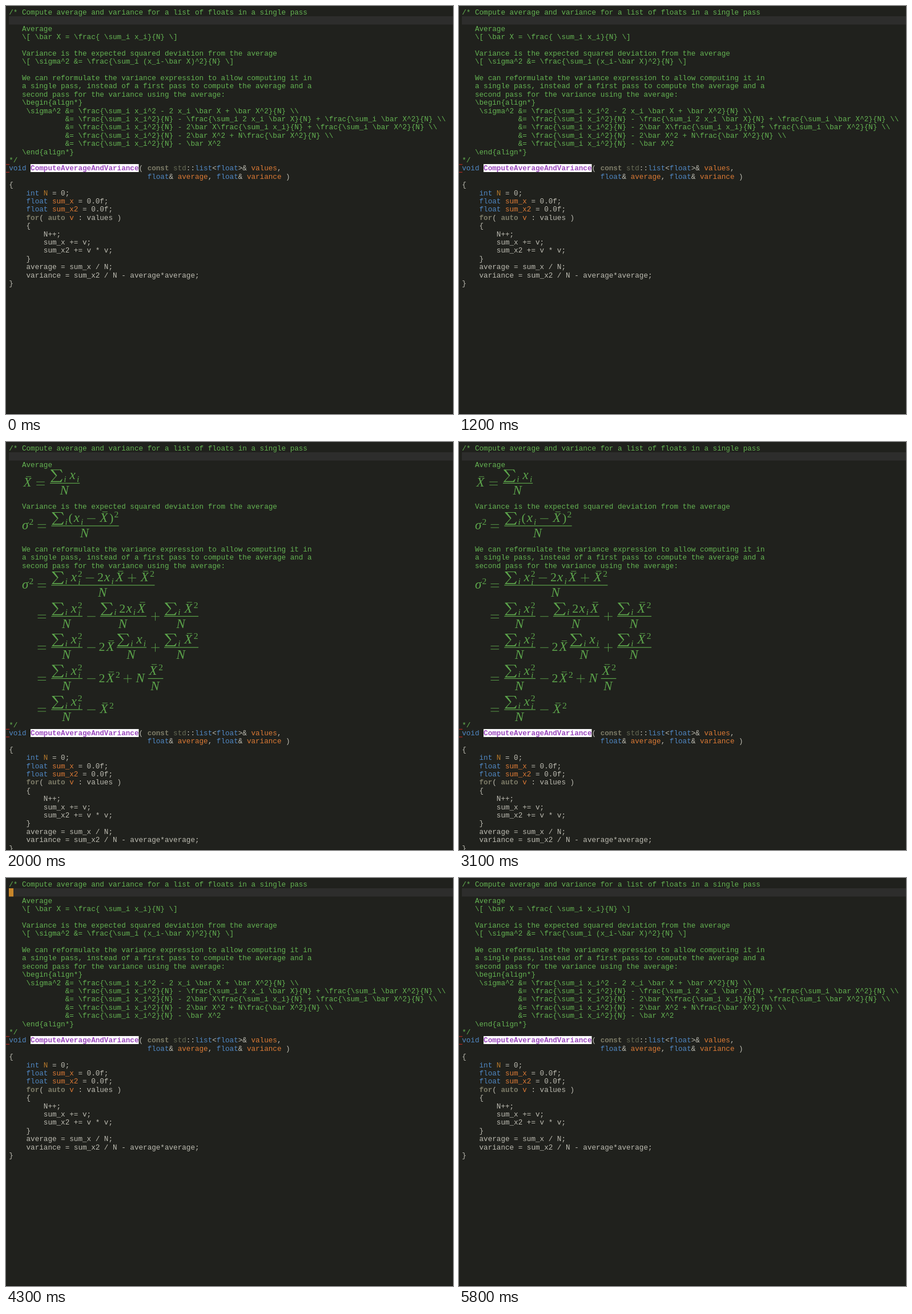
Animation of 783 by 715 pixels, one loop 6100 ms. Source, as an HTML page with a canvas:

```html
<!DOCTYPE html>
<html>
<head>
<meta charset="utf-8">
<style>
html, body { margin: 0; width: 100%; height: 100%; overflow: hidden; background: #20211d; }
canvas { display: block; }
</style>
</head>
<body>
<canvas id="stage" width="783" height="715"></canvas>
<script>
const g = document.getElementById('stage').getContext('2d');
const LOOP = 6100, CELL = 7.576, ROW = 14.4, LEFT = 5.2, TOP = 10.7;
const GREEN = '#64b352', MATH = '#5ca44b';
const COLORS = { d: '#bdbcb2', b: '#5088c4', o: '#dc7a35', n: '#b87a2c', s: '#666a55', k: '#7d7c68', f: '#9a48bd' };
const BOLD = 'kf';
// Times at which the cursor is visible
const CURSOR = [[700, 1200], [1500, 2000], [2500, 3000], [3500, 4000], [4300, 4800], [5400, 5800]];
const RENDER_ON = 1500, RENDER_OFF = 4300;

const title = '/* Compute average and variance for a list of floats in a single pass';
const reform = [
  '   We can reformulate the variance expression to allow computing it in',
  '   a single pass, instead of a first pass to compute the average and a',
  '   second pass for the variance using the average:'
];
const average = '   Average';
const variance = '   Variance is the expected squared deviation from the average';
const rawComment = [
  title, '', average,
  String.raw`   \[ \bar X = \frac{ \sum_i x_i}{N} \]`, '',
  variance,
  String.raw`   \[ \sigma^2 &= \frac{\sum_i (x_i-\bar X)^2}{N} \]`, '',
  ...reform,
  String.raw`   \begin{align*}`,
  String.raw`    \sigma^2 &= \frac{\sum_i x_i^2 - 2 x_i \bar X + \bar X^2}{N} \\`,
  String.raw`             &= \frac{\sum_i x_i^2}{N} - \frac{\sum_i 2 x_i \bar X}{N} + \frac{\sum_i \bar X^2}{N} \\`,
  String.raw`             &= \frac{\sum_i x_i^2}{N} - 2\bar X\frac{\sum_i x_i}{N} + \frac{\sum_i \bar X^2}{N} \\`,
  String.raw`             &= \frac{\sum_i x_i^2}{N} - 2\bar X^2 + N\frac{\bar X^2}{N} \\`,
  String.raw`             &= \frac{\sum_i x_i^2}{N} - \bar X^2`,
  String.raw`   \end{align*}`
];

// [c text] sets text in colour c
const code = [
  '[b void] [f ComputeAverageAndVariance]( [k const] [s std]::[b list]<[b float]>& [o values],',
  ' '.repeat(32) + '[b float]& [o average], [b float]& [o variance] )',
  '{',
  '    [b int] [n N] = 0;',
  '    [b float] [o sum_x] = 0.0f;',
  '    [b float] [o sum_x2] = 0.0f;',
  '    [k for]( [k auto] [o v] : values )',
  '    {',
  '        N++;',
  '        sum_x += v;',
  '        sum_x2 += v * v;',
  '    }',
  '    average = sum_x / N;',
  '    variance = sum_x2 / N - average*average;',
  '}'
];

// Formulas: {..} is a fraction over N, S a sum, X has a bar, _ is index i, ^ a square, & both
const formulas = [
  [28.5, 72.3, 'X={S_,x_}'],
  [27.5, 147, 's^={S_(x_-X)^}'],
  [27.5, 251, 's^={S_,x&-2x_X+X^}'],
  [48.8, 305.5, '={S_,x&}-{S_,2x_X}+{S_,X^}'],
  [48.8, 360, '={S_,x&}-2X{S_,x_}+{S_,X^}'],
  [48.8, 414.5, '={S_,x&}-2X^+N{X^}'],
  [48.8, 469, '={S_,x&}-X^']
];
const ADVANCE = { S: 23.3, s: 12.5, X: 18, x: 12.6, N: 20, 2: 11, '(': 8.6, ')': 8.6, _: 6.3, '^': 8.8, '&': 8.8, ',': 3.7, '=': 28, '+': 25.9, '-': 25.9 };
const NULL_GAP = 2.5, THIN = 0.9;
const SUM = [0, 0, 18.7, 0, 20.7, 5.5, 20, 5.5, 16.5, 0.9, 4, 0.9, 11.2, 10.4, 2.6, 20.3, 16.5, 20.3, 20, 16.5, 20.7, 16.5, 18.7, 22, 0, 22, 0, 21.2, 9.3, 11.3, 0, 0.8];

function box(color, x, y, w, h) {
  g.fillStyle = color;
  g.fillRect(x, y, w, h);
}

function cells(text, col, y, color, bold) {
  g.font = (bold ? 'bold ' : '') + '12.63px "Liberation Mono", monospace';
  g.textAlign = 'left';
  g.fillStyle = color;
  [...text].forEach((c, i) => c !== ' ' && g.fillText(c, LEFT + (col + i) * CELL, y + 4));
}

function comment(text, y) {
  cells(text, 0, y, GREEN);
}

function codeBlock(y) {
  comment('*/', y);
  y += ROW;
  box('#c8281e', 0, y - 7, 6, 1);
  box('#c8281e', 0, y + 6.5, 6, 1);
  box('#fff', 43, Math.round(y - 7), 189.5, 14);
  code.forEach((line, r) => {
    let col = 0;
    for (const [, tag, tagged, plain] of line.matchAll(/\[(\w) ([^\]]*)\]|([^[]+)/g)) {
      const text = tagged || plain;
      cells(text, col, y + r * ROW, COLORS[tag || 'd'], tag && BOLD.includes(tag));
      col += text.length;
    }
  });
}

function glyph(c, x, y, size, italic) {
  g.font = (italic ? 'italic ' : '') + size + 'px "Liberation Serif", serif';
  g.textAlign = 'center';
  g.fillText(c, x, y);
}

function symbol(c, x, y) {
  const mid = x + ADVANCE[c] / 2;
  if (c === 'S') {
    g.beginPath();
    for (let i = 0; i < SUM.length; i += 2) g.lineTo(x + 1.2 + SUM[i], y - 17 + SUM[i + 1]);
    g.fill();
  } else if (c === '=') {
    g.fillRect(mid - 7.3, y - 8.8, 14.6, THIN);
    g.fillRect(mid - 7.3, y - 3.4, 14.6, THIN);
  } else if (c === '-' || c === '+') {
    g.fillRect(mid - 7.3, y - 6.2, 14.6, THIN);
    if (c === '+') g.fillRect(mid - THIN / 2, y - 13, THIN, 14.6);
  } else if (c === '_') glyph('i', mid, y + 4.7, 15.5, true);
  else if (c === '^') glyph('2', mid, y - 8, 15.5);
  else if (c === '&') {
    glyph('i', x + 3.2, y + 5.7, 15.5, true);
    glyph('2', mid, y - 8, 15.5);
  } else if (c === 's') glyph('σ', mid, y, 23, true);
  else if ('XxN'.includes(c)) {
    glyph(c, mid - (c === 'N' ? 1 : 0), y, 23, true);
    if (c === 'X') g.fillRect(mid - 2.5, y - 18, 9, THIN);
  } else if (c !== ',') glyph(c, mid, y, 22);
}

function run(text, x, y) {
  for (const c of text) {
    symbol(c, x, y);
    x += ADVANCE[c];
  }
  return x;
}

function formula(x, axis, text) {
  g.fillStyle = MATH;
  for (const [, top, plain] of text.matchAll(/\{(.*?)\}|([^{]+)/g)) {
    if (plain) {
      x = run(plain, x, axis + 6);
      continue;
    }
    const start = x + NULL_GAP, end = run(top, start, axis - 7);
    g.fillRect(start, axis - 0.6, end - start, 1.2);
    symbol('N', (start + end - ADVANCE.N) / 2, axis + 20);
    x = end + NULL_GAP;
  }
}

function draw(t) {
  box('#20211d', 0, 0, 783, 715);
  box('#2d2d2c', 5, 18, 778, 14.5);
  box('#171814', 0, 714, 783, 1);
  if (CURSOR.some(([on, off]) => t >= on && t < off)) box('#c8862a', 5, 18, 8, 14.5);
  if (t >= RENDER_ON && t < RENDER_OFF) {
    comment(title, TOP);
    comment(average, 39.5);
    comment(variance, 113);
    reform.forEach((line, r) => comment(line, 188 + r * ROW));
    formulas.forEach(f => formula(...f));
    codeBlock(495.5);
  } else {
    rawComment.forEach((line, r) => comment(line, TOP + r * ROW));
    codeBlock(TOP + rawComment.length * ROW);
  }
}

function frame() {
  draw(performance.now() % LOOP);
  requestAnimationFrame(frame);
}
frame();
</script>
</body>
</html>
```
